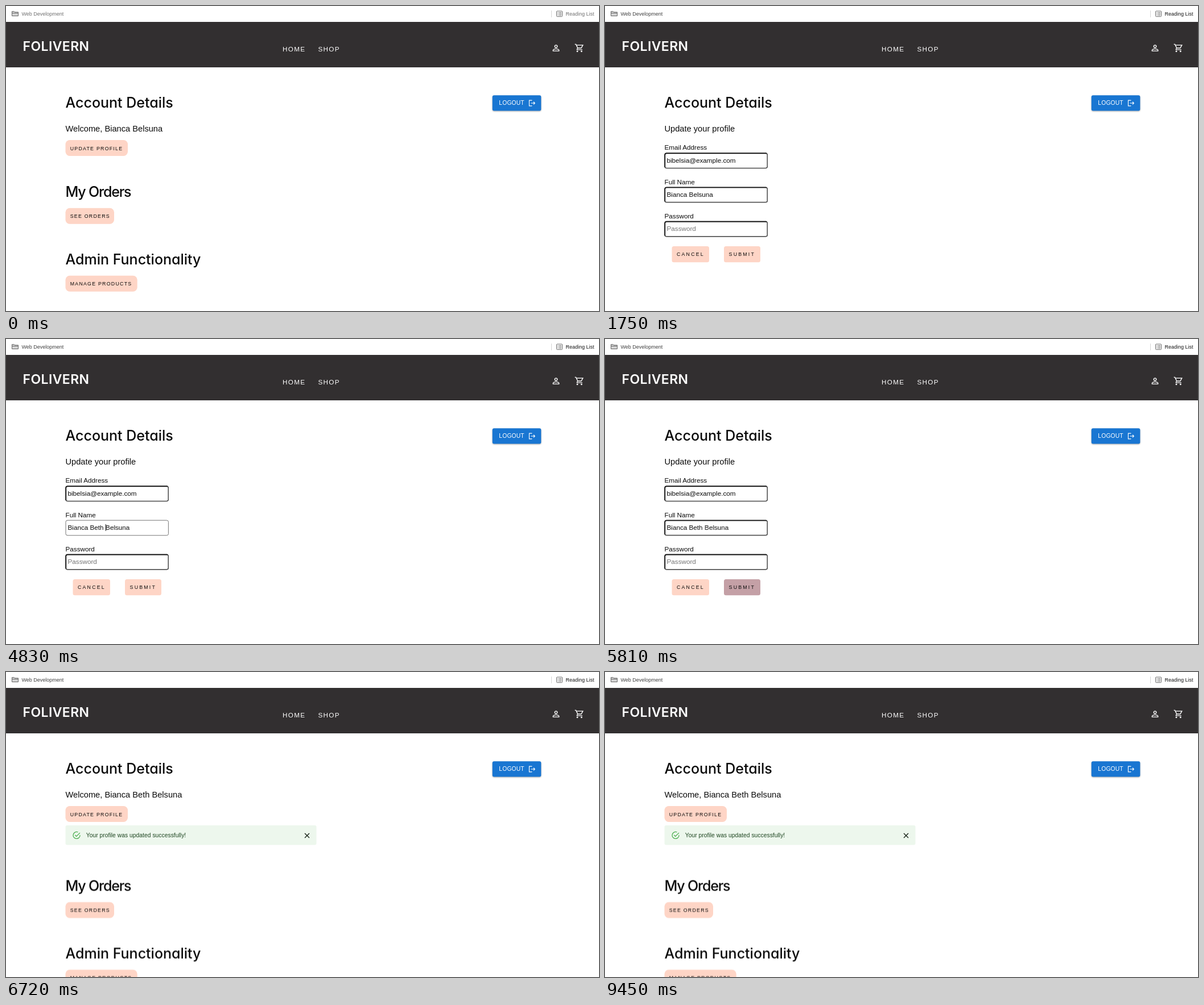
Write an HTML page that moves like this. It is 1042 by 537 pixels and loops after 9520 ms.

```html
<!DOCTYPE html>
<html lang="en">
<head>
<meta charset="utf-8">
<title>Profile update</title>
<style>
  html, body { margin: 0; width: 100%; height: 100%; overflow: hidden; background: #fff; }
  svg { display: block; width: 100vw; height: 100vh; }
  text { font-family: "Liberation Sans", Arial, sans-serif; fill: #0b0b0b; white-space: pre; }

  .script { font: 500 25px Inter, sans-serif; font-feature-settings: "cv11"; }
  .brand { font-weight: 600; font-size: 23px; letter-spacing: .4px; fill: #fff; }
  .nav { font-size: 11.7px; letter-spacing: 1.3px; fill: #fff; }
  .lead { font-size: 14.65px; }
  .body { font-size: 11.7px; }
  .hint { fill: #757575; }
  .pill text { font-size: 8.8px; letter-spacing: 1.25px; }
  .pill.wide text { letter-spacing: 2.2px; }
  .pill rect { fill: #fed5c6; }
  .bar text { font-size: 9px; }
  .logout text { font-size: 10.27px; letter-spacing: .2px; fill: #fff; }
  .logout rect { fill: #1976d2; filter: drop-shadow(0 1.2px 1px #0005); }
  .alert text { font-size: 10.27px; letter-spacing: .05px; fill: #1e4620; }
  .line { fill: none; stroke: #fff; stroke-width: 1.9; }

  .box { fill: #fff; stroke: #767676; }
  .inset { fill: none; stroke: #505050; stroke-width: 1.5; }
  .shade { fill: none; stroke: #111; stroke-width: 1.7; }

  /* Every part shares one clock and changes in hard steps. */
  .home, .form, .before, .done, .sections, .bar text, .update rect,
  .submit rect, .idle, .tail, .caret { animation: 9520ms step-end infinite; }
  .home { animation-name: home; }
  .form { animation-name: form; }
  .before { animation-name: before; }
  .done { animation-name: done; }
  .sections { animation-name: drop; }
  .bar text { --awake: #404040; animation-name: wake; }
  .bar .strong { --awake: #161616; }
  .update rect { animation-name: pressUpdate; }
  .submit rect { animation-name: pressSubmit; }
  .idle { animation-name: blur; }
  .tail { animation-name: type; }
  .caret { animation-name: blink; }

  @keyframes home { 0%, 62.49% { opacity: 1 } 16.9% { opacity: 0 } }
  @keyframes form { 0%, 62.49% { opacity: 0 } 16.9% { opacity: 1 } }
  @keyframes before { 0% { opacity: 1 } 16.9%, 100% { opacity: 0 } }
  @keyframes done { 0% { opacity: 0 } 62.49%, 100% { opacity: 1 } }
  @keyframes drop { 0% { transform: none } 62.49%, 100% { transform: translateY(49.4px) } }
  @keyframes wake { 0% { fill: #707070 } 9.55%, 100% { fill: var(--awake) } }
  @keyframes pressUpdate {
    0%, 16.9%, 100% { fill: #fed5c6 }
    9.55% { fill: #e1bbb6 }
    10.29% { fill: #c4a0a6 }
  }
  @keyframes pressSubmit {
    0%, 62.49%, 100% { fill: #fed5c6 }
    57.35% { fill: #e1bbb6 }
    58.08% { fill: #c4a0a6 }
  }
  @keyframes blur { 0%, 57.35%, 100% { opacity: 1 } 30.14% { opacity: 0 } }
  @keyframes type {
    0% { transform: none }
    39.7% { transform: translateX(7.8px) }
    41.17% { transform: translateX(14.3px) }
    43.38% { transform: translateX(17.6px) }
    44.85% { transform: translateX(24.1px) }
    47.79%, 100% { transform: translateX(27.4px) }
  }
  @keyframes blink {
    0%, 35.29%, 52.94%, 100% { opacity: 0 }
    30.14%, 39.7% { opacity: 1 }
  }
</style>
</head>
<body>
<svg viewBox="0 0 1042 537" preserveAspectRatio="none">
  <defs>
    <g id="inset">
      <rect class="inset" x="105.2" y="259.2" width="180" height="26.2" rx="2.8"/>
      <path class="shade" d="M105.3 284V262q0-2.7 2.7-2.7H284"/>
    </g>
    <rect id="box" class="box" x="105" y="259" width="180.4" height="26.6" rx="3"/>
  </defs>

  <g class="bar">
    <g fill="#d2d2d2" stroke="#6a6a6a">
      <path d="M10.5 17.5v-8h4l1.2 1.3h5.8v6.7zM10.5 12.5h11"/>
      <rect x="967.5" y="9" width="10" height="9.6" rx="1" fill="none"/>
      <path d="M969.2 11.6h1.2m1 0h4.6m-6.8 2.3h1.2m1 0h4.6m-6.8 2.3h1.2m1 0h4.6"/>
    </g>
    <path d="M958.5 8v12" stroke="#d5d5d5"/>
    <text x="27.5" y="17">Web Development</text>
    <text class="strong" x="983.5" y="17">Reading List</text>
  </g>

  <rect y="28" width="1042" height="80" fill="#322f30"/>
  <text class="script brand" x="29.5" y="79">FOLIVERN</text>
  <text class="nav" x="486" y="80">HOME</text>
  <text class="nav" x="548.5" y="80">SHOP</text>
  <g class="line" transform="translate(957.7 65.2) scale(.733)">
    <circle cx="12" cy="8" r="3.05"/>
    <path d="M4.95 19.05V17c0-1.7 4.4-3.05 7.05-3.05s7.05 1.35 7.05 3.05v2.05z"/>
  </g>
  <g class="line" transform="translate(998.8 65.2) scale(.733)">
    <path d="M1 3h2.6l4.3 9-1.6 2.7Q5.6 16 7 16h12M5 5h15.3l-3.9 7H8"/>
    <g fill="#fff" stroke="none"><circle cx="7" cy="20" r="2"/><circle cx="17" cy="20" r="2"/></g>
  </g>

  <text class="script" x="104.5" y="179">Account Details</text>
  <g class="logout">
    <rect x="854.7" y="157.2" width="85.6" height="27.2" rx="3"/>
    <text x="866.3" y="174.4">LOGOUT</text>
    <path class="line" transform="translate(917 163.7) scale(.611)"
      d="M12 4H4v16h8M9 12h11M16.3 8.3l3.7 3.7-3.7 3.7"/>
  </g>

  <g class="home">
    <text class="lead before" x="104.5" y="221">Welcome, Bianca Belsuna</text>
    <g class="pill update">
      <rect x="104.5" y="236" width="109.5" height="28" rx="7.5"/>
      <text x="112.7" y="253.6">UPDATE PROFILE</text>
    </g>
    <g class="sections">
      <text class="script" x="104.5" y="336" letter-spacing="-1.2">My Orders</text>
      <g class="pill">
        <rect x="104.5" y="355.7" width="85.5" height="28" rx="7.5"/>
        <text x="112.7" y="373.2">SEE ORDERS</text>
      </g>
      <text class="script" x="104.5" y="455">Admin Functionality</text>
      <g class="pill">
        <rect x="104.5" y="474.7" width="126.2" height="28" rx="7.5"/>
        <text x="112.7" y="492.2">MANAGE PRODUCTS</text>
      </g>
    </g>
  </g>

  <g class="done">
    <text class="lead" x="104.5" y="221">Welcome, Bianca Beth Belsuna</text>
    <g class="alert">
      <rect x="104.5" y="270" width="441" height="34.6" rx="3" fill="#edf7ed"/>
      <path transform="translate(116 279.4) scale(.673)" fill="none" stroke="#4caf50" stroke-width="1.9"
        d="M20.8 11.5a8.9 8.9 0 1 1-5.4-7.7M7.8 11.3l3.6 3.6L20.7 5.5"/>
      <text x="140.7" y="291.3">Your profile was updated successfully!</text>
      <path d="M525 284l8 8m0-8l-8 8" stroke="#182318" stroke-width="1.4"/>
    </g>
  </g>

  <g class="form">
    <text class="lead" x="104.5" y="221">Update your profile</text>
    <text class="body" x="104.5" y="253.3">Email Address</text>
    <use href="#box"/>
    <use href="#inset"/>
    <text class="body" x="108.5" y="276">bibelsia@example.com</text>

    <text class="body" x="104.5" y="313.5">Full Name</text>
    <use href="#box" y="60.2"/>
    <g class="idle"><use href="#inset" y="60.2"/></g>
    <text class="body" x="108.5" y="336">Bianca Beth</text>
    <g class="tail">
      <rect x="147.6" y="323" width="70" height="18" fill="#fff"/>
      <text class="body" x="147.6" y="336">Belsuna</text>
      <rect class="caret" x="147.4" y="326" width="1" height="12"/>
    </g>

    <text class="body" x="104.5" y="373.7">Password</text>
    <use href="#box" y="120.4"/>
    <use href="#inset" y="120.4"/>
    <text class="body hint" x="108.5" y="396.4">Password</text>

    <g class="pill wide">
      <rect x="117.5" y="423" width="65.5" height="28.2" rx="3.5"/>
      <text x="126" y="440.4">CANCEL</text>
    </g>
    <g class="pill wide submit">
      <rect x="209" y="423" width="64" height="28.2" rx="3.5"/>
      <text x="217.6" y="440.4">SUBMIT</text>
    </g>
  </g>
</svg>
</body>
</html>
```
